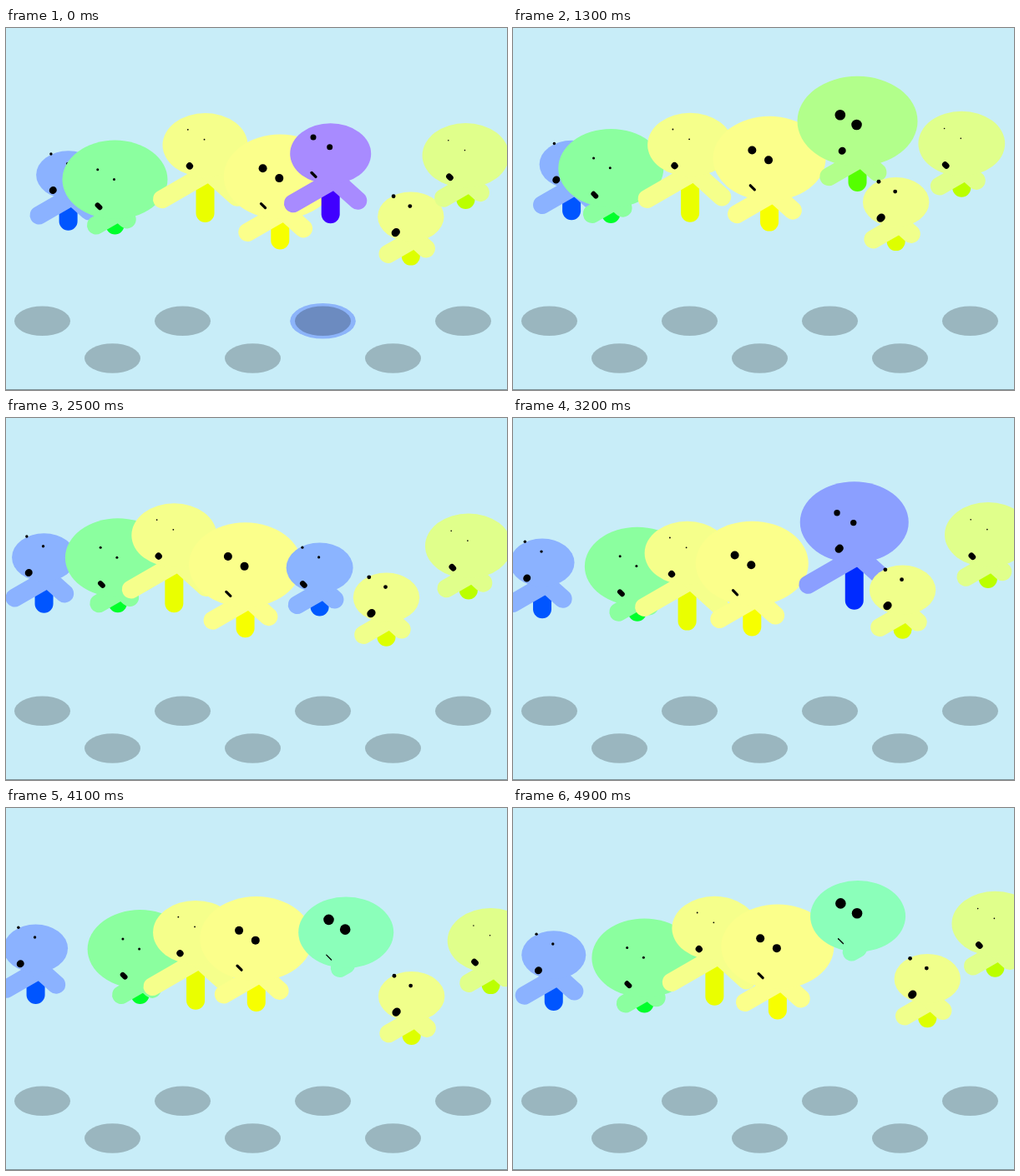
An HTML page for the animation above (5000 ms loop, 600x434 px).

```html
<!DOCTYPE html>
<html lang="en">
<head>
<meta charset="utf-8">
<title>Bobbing creatures</title>
<style>
html, body { margin: 0; width: 100%; height: 100%; overflow: hidden; background: #c8edf8; }
svg { display: block; width: 100%; height: 100%; }
</style>
</head>
<body>
<svg id="stage" viewBox="0 0 600 434"></svg>
<script>
const LOOP = 5000, STEP = 100;
const GUEST_SLOT = 4, GUEST_SPEED = 4.6;
const stage = document.getElementById('stage');

// size is the head's half width, sway and bob are phases
const residents = [
  { slot: 0, hue: 220, size: 38.5, limb: 34.5, eye: 1.7, mouth: 8.5, sway: 0.48, bob: 1.25, speed: 3.85 },
  { slot: 1, hue: 130, size: 63, limb: 20, eye: 1.5, mouth: 6, sway: 4.31, bob: 0.9, speed: 3.8 },
  { slot: 2, hue: 65, size: 51, limb: 53.5, eye: 0.9, mouth: 8, sway: 5.49, bob: 3.39, speed: 5 },
  { slot: 3, hue: 62, size: 67.5, limb: 39, eye: 5, mouth: 3.2, sway: 6.01, bob: -0.12, speed: 2.2 },
  { slot: 5, hue: 68, size: 39.7, limb: 25.5, eye: 2.4, mouth: 9, sway: 5.17, bob: 0, speed: 3.14 },
  { slot: 6, hue: 76, size: 51.9, limb: 24.5, eye: 0.8, mouth: 7, sway: 4.31, bob: 1.26, speed: 3.5 }
];

const guests = {
  violet: { hue: 255, size: 48.5, limb: 45.7, eye: 3.5, mouth: 3.5, sway: 1.68, bob: 4.28 },
  leaf: { hue: 100, size: 72, limb: 33.5, eye: 6.3, mouth: 8.5, sway: 1.07, bob: 4.13 },
  aqua: { hue: 144, size: 57, limb: 2.6, eye: 6.3, mouth: 1.3, sway: 4.85, bob: 0.69 },
  azure: { hue: 219, size: 40, limb: 25, eye: 1.6, mouth: 6.5, sway: 4.85, bob: 4.68 },
  iris: { hue: 230, size: 65, limb: 58, eye: 3.7, mouth: 9, sway: 3.84, bob: 3.9 }
};

// times at which a new guest steps in
const visits = { 0: 'violet', 700: 'leaf', 1400: 'aqua', 2000: 'azure', 3200: 'iris', 3700: 'aqua' };
const flashes = [0, 800];

const holeX = slot => 43.5 + 84 * slot;
const holeY = slot => slot % 2 ? 396 : 351.3;

function el(parent, tag, attrs) {
  const node = document.createElementNS('http://www.w3.org/2000/svg', tag);
  for (const key in attrs) node.setAttribute(key, attrs[key]);
  return parent.appendChild(node);
}

function ellipse(parent, cx, cy, rx, ry, fill) {
  return el(parent, 'ellipse', { cx, cy, rx, ry, fill });
}

// a round-ended stroke from a point, at an angle in degrees
function stick(parent, x, y, angle, length, width, stroke) {
  const a = angle * Math.PI / 180;
  el(parent, 'line', {
    x1: x, y1: y, x2: x + length * Math.cos(a), y2: y + length * Math.sin(a),
    stroke, 'stroke-width': width, 'stroke-linecap': 'round'
  });
}

function creature({ slot, hue, size, limb, eye, mouth, sway, bob, speed }) {
  const tall = size * 0.75, hip = tall * 0.735;
  const dark = `hsl(${hue},100%,50%)`, light = `hsl(${hue},100%,77.3%)`;
  const node = el(stage, 'g', {});

  stick(node, 0, hip, 90, limb, 22, dark);
  stick(node, 0, hip + 7, 150, limb + 6, 22, light);
  stick(node, 0, hip, 42, limb * 0.96, 22, light);
  ellipse(node, 0, 0, size, tall, light);

  const eyeY = 0.7 * tall - 45.3;
  ellipse(node, -20.7, eyeY, eye, eye, '#000');
  ellipse(node, -1, eyeY + 11.8, eye, eye, '#000');

  // thin mouths are long and slant down, wide ones are almost round
  const reach = 3 - 0.045 * mouth * mouth;
  const half = Math.abs(reach);
  stick(node, -18.5 - 0.7 * reach - reach, 0.68 * tall - 1 + 0.6 * reach - half,
        reach > 0 ? 45 : 135, 2 * Math.SQRT2 * half, mouth, '#000');

  // bigger creatures hover higher above their hole
  const homeX = holeX(slot) + 11.6, homeY = holeY(slot) - 112.3 - 2.3 * tall;
  return {
    node,
    move(t) {
      const x = homeX + 22 * Math.cos(t - sway);
      const y = homeY + 11 * Math.cos(speed * t - bob);
      node.setAttribute('transform', `translate(${x.toFixed(2)} ${y.toFixed(2)})`);
    }
  };
}

const show = (node, on) => { node.style.display = on ? '' : 'none'; };

el(stage, 'rect', { width: 600, height: 434, fill: '#c8edf8' });
el(stage, 'rect', { y: 433, width: 600, height: 1, fill: '#7d9298' });

const ring = ellipse(stage, holeX(GUEST_SLOT), holeY(GUEST_SLOT), 39.3, 21.3, '#8cb4fa');
for (let slot = 0; slot < 7; slot++) {
  ellipse(stage, holeX(slot), holeY(slot), 33.5, 17.8, 'rgba(0,0,0,.23)');
}

// later slots overlap earlier ones
const crowd = [], visitors = {};
const addResidents = test => residents.filter(test).forEach(r => crowd.push(creature(r)));
addResidents(r => r.slot < GUEST_SLOT);
for (const name in guests) {
  visitors[name] = creature({ ...guests[name], slot: GUEST_SLOT, speed: GUEST_SPEED });
}
addResidents(r => r.slot > GUEST_SLOT);

function draw(ms) {
  const now = Math.floor(ms / STEP) * STEP, t = now / 1000;
  const guest = visits[Object.keys(visits).filter(start => start <= now).pop()];
  crowd.forEach(c => c.move(t));
  for (const name in visitors) {
    show(visitors[name].node, name === guest);
    visitors[name].move(t);
  }
  show(ring, flashes.includes(now));
}

const begin = performance.now();
function tick() {
  draw((performance.now() - begin) % LOOP);
  requestAnimationFrame(tick);
}
tick();
</script>
</body>
</html>
```
